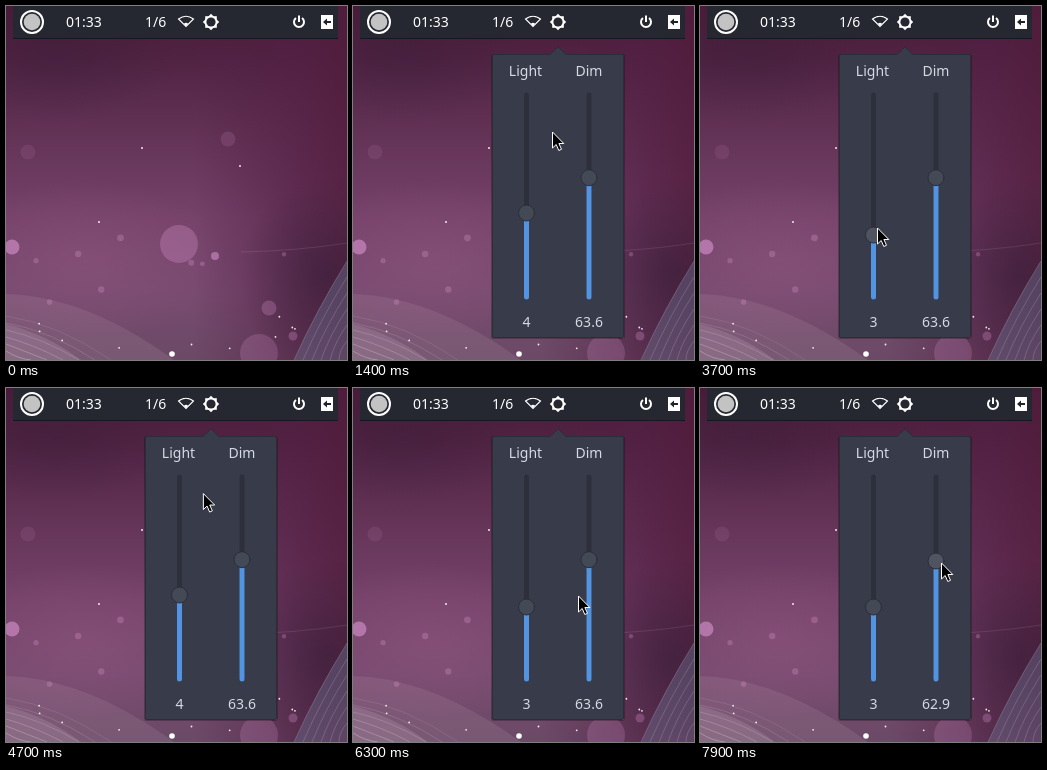
Animation of 341 by 354 pixels, one loop 8 s. Source, as an HTML page:

```html
<!DOCTYPE html>
<html lang="en">
<head>
<meta charset="utf-8">
<title>Brightness sliders</title>
<style>
html, body { margin: 0; width: 100%; height: 100%; overflow: hidden; background: #45193b; }
svg { display: block; width: 341px; height: 354px; }
text { font: 14px "Noto Sans", "Open Sans", sans-serif; fill: #d3dae3; }
.bar text { fill: #fff; font-weight: 500; }
.mid text { text-anchor: middle; }
</style>
</head>
<body>
<svg viewBox="0 0 341 354">
  <defs>
    <linearGradient id="sky" x2="0" y2="1">
      <stop offset="0" stop-color="#4a1b3b"/>
      <stop offset=".15" stop-color="#512343"/>
      <stop offset=".35" stop-color="#623255"/>
      <stop offset=".6" stop-color="#75426a"/>
      <stop offset=".8" stop-color="#784a70"/>
      <stop offset="1" stop-color="#6b4a66"/>
    </linearGradient>
    <linearGradient id="side">
      <stop offset=".55" stop-color="#521f42" stop-opacity="0"/>
      <stop offset=".85" stop-color="#521f42" stop-opacity=".6"/>
      <stop offset="1" stop-color="#521c3c" stop-opacity=".8"/>
    </linearGradient>
    <radialGradient id="glow">
      <stop offset="0" stop-color="#92587f" stop-opacity=".45"/>
      <stop offset="1" stop-color="#92587f" stop-opacity="0"/>
    </radialGradient>
    <radialGradient id="dark">
      <stop offset="0" stop-color="#2d1c33" stop-opacity=".5"/>
      <stop offset="1" stop-color="#2d1c33" stop-opacity="0"/>
    </radialGradient>
  </defs>

  <rect width="341" height="354" fill="url(#sky)"/>
  <rect width="341" height="354" fill="url(#side)"/>
  <ellipse cx="80" cy="255" rx="140" ry="80" fill="url(#glow)"/>
  <ellipse cx="50" cy="50" rx="120" ry="70" fill="url(#dark)" opacity=".6"/>
  <ellipse cx="320" cy="270" rx="85" ry="100" fill="url(#dark)"/>
  <path d="M0 288Q80 290 168 354H0Z" fill="#b59aae" opacity=".17"/>
  <path d="M0 318Q40 328 75 354H0Z" fill="#c9b2c4" opacity=".2"/>
  <path d="M341 255Q310 304 288 354H341Z" fill="#6c7a98" opacity=".38"/>
  <g id="rays" fill="none" stroke="#e3cfe0"></g>
  <g id="bokeh"></g>

  <g class="bar">
    <path d="M7 0H332V33H7Z" fill="#17181f"/>
    <path d="M7 0H332V32H7Z" fill="#252831"/>
    <circle cx="26" cy="16" r="11" fill="none" stroke="#fff" stroke-width="2"/>
    <circle cx="26" cy="16" r="8.3" fill="#c3c3c3"/>
    <text x="60" y="21">01:33</text>
    <text x="139" y="21">1/6</text>
    <path d="M172.5 13Q180 7.500 187.5 13L180 20.5Z" fill="none" stroke="#fff" stroke-width="1.1"/>
    <path d="M178 17.500Q180 16 182 17.500L180 20.5Z" fill="#fff"/>
    <g transform="translate(205 16)" fill="#fff">
      <path id="tooth" d="M-5.8 -5.8H5.8V5.8H-5.8Z"/>
      <use href="#tooth" transform="rotate(45)"/>
      <circle r="4.6" fill="#252831"/>
    </g>
    <path d="M290 12A5 5 0 1 0 296 12M293 9.500V16" fill="none" stroke="#fff" stroke-width="2"/>
    <path d="M315 9H327V23H315Z" fill="#fff"/>
    <path d="M317 16L321 12.500V15H325V17H321V19.500Z" fill="#20232b"/>
  </g>

  <g id="panel" class="mid">
    <rect x="138" y="48" width="134" height="285" rx="3" opacity=".25"/>
    <path d="M141 48.500H197L205 41L213 48.500H269Q270.500 48.500 270.500 50V330Q270.500 331.500 269 331.500H141Q139.500 331.500 139.500 330V50Q139.500 48.500 141 48.500Z" fill="#383c4a" stroke="#2b2e39"/>
    <text x="172.500" y="70">Light</text>
    <text x="236" y="70">Dim</text>
    <g id="sliders" stroke-width="5" stroke-linecap="round"></g>
  </g>
  <path id="cursor" d="M0 0V16L3.700 12.500L6.300 18.500L9 17.300L6.400 11.500H11.300Z" fill="#000" stroke="#fff"/>
</svg>
<script>
const $ = id => document.getElementById(id);
const clamp = (v, lo, hi) => Math.min(hi, Math.max(lo, v));

let seed = 11;
const random = () => (seed = seed * 16807 % 2147483647) / 2147483647;

// Light rays fanning out of both lower corners
let rays = '';
for (let i = 0; i < 6; i++) {
  const y = 310 + i * 7, x = 105 - i * 16, top = 255 + i * 16, foot = 288 + i * 9;
  rays += `<path opacity="${.12 + i * .05}" d="M0 ${y}Q${x / 2} ${y + 8} ${x} 354"/>
    <path opacity=".2" d="M341 ${top}Q${(341 + foot) / 2 - 4} ${(top + 354) / 2} ${foot} 354"/>`;
}
$('rays').innerHTML = rays + '<path opacity=".12" d="M235 246Q290 245 341 237"/>';

const dot = (x, y, r, o, fill = '#e29bd8') =>
  `<circle cx="${x}" cy="${y}" r="${r}" opacity="${o}" fill="${fill}"/>`;
let dots = dot(6, 241, 7.5, .55) + dot(173, 238, 19, .28) + dot(222, 133, 7.5, .15) +
  dot(22, 146, 7.5, .1) + dot(209, 250, 4, .5) + dot(263, 302, 7.5, .25) +
  dot(253, 347, 19, .2) + dot(287, 330, 4.5, .28) + dot(166, 348, 2.8, 1, '#fff') +
  dot(136, 142, 1, .9, '#fff') + dot(234, 160, 1, .9, '#fff') + dot(93, 216, 1, .9, '#fff');
for (let i = 0; i < 8; i++) dots += dot(30 + random() * 300, 210 + random() * 100, 2 + random() * 2, .28);
for (let i = 0; i < 10; i++) dots += dot(30 + random() * 270, 310 + random() * 40, .9, .9, '#fff');
$('bokeh').innerHTML = dots;

function slider(x) {
  const g = document.createElementNS('http://www.w3.org/2000/svg', 'g');
  g.innerHTML = `<path d="M${x} 89V291" stroke="#2d303b"/><path stroke="#5294e2"/>
    <circle cx="${x}" stroke-width="1"/><text x="${x}" y="321"></text>`;
  $('sliders').append(g);
  const [, fill, knob, label] = g.children;
  return (y, value, pressed, [cx, cy]) => {
    const hover = Math.hypot(cx - x, cy - y) < 9;
    const color = pressed ? '#5294e2' : hover ? '#505461' : '#444956';
    fill.setAttribute('d', `M${x} ${y}V291`);
    knob.setAttribute('cy', y);
    knob.setAttribute('r', pressed ? 8.3 : 8);
    knob.setAttribute('fill', color);
    knob.setAttribute('stroke', pressed ? color : '#2b2e39');
    label.textContent = value;
  };
}
const light = slider(173.5), dim = slider(236);

// Pointer stops: time, x, y
const stops = [
  [0, 322, 360], [700, 202.5, 13], [900, 202.5, 13], [1400, 199.5, 126], [1800, 284, 334],
  [2100, 275, 63], [2300, 345, 100], [2800, 345, 100], [2900, 177.5, 222], [4300, 177.5, 222],
  [4500, 205, 69], [5100, 175.5, 210], [5500, 175.5, 160], [5900, 175.5, 222],
  [6300, 225.5, 208], [6600, 246, 313], [6900, 168, 280], [7500, 241.5, 175], [8000, 241.5, 175]
];

function pointer(t) {
  const i = stops.findIndex(s => s[0] > t);
  const [t0, x0, y0] = stops[i - 1], [t1, x1, y1] = stops[i];
  const p = (t - t0) / (t1 - t0), e = p * p * (3 - 2 * p);
  return [x0 + (x1 - x0) * e, y0 + (y1 - y0) * e];
}

// The light knob is scrolled down and up in notches, then dragged by the pointer
function lightY(t) {
  const notches = clamp(Math.round(2.4 - Math.abs(t - 3300) / 350), 0, 2);
  return t < 5100 ? 207 + 22 * notches : pointer(Math.min(t, 5900))[1] - 3;
}

function draw(now) {
  const t = Math.floor(now % 8000 / 100) * 100;
  const tip = pointer(t), y = lightY(t), scrolled = t >= 7700;
  $('cursor').setAttribute('transform', `translate(${tip})`);
  $('panel').setAttribute('opacity', clamp((t - 800) / 200, 0, 1));
  light(y, Math.floor((308 - y) / 25), t >= 5100 && t < 5900, tip);
  dim(scrolled ? 173 : 171.7, scrolled ? 62.9 : 63.6, false, tip);
  requestAnimationFrame(draw);
}
requestAnimationFrame(draw);
</script>
</body>
</html>
```
